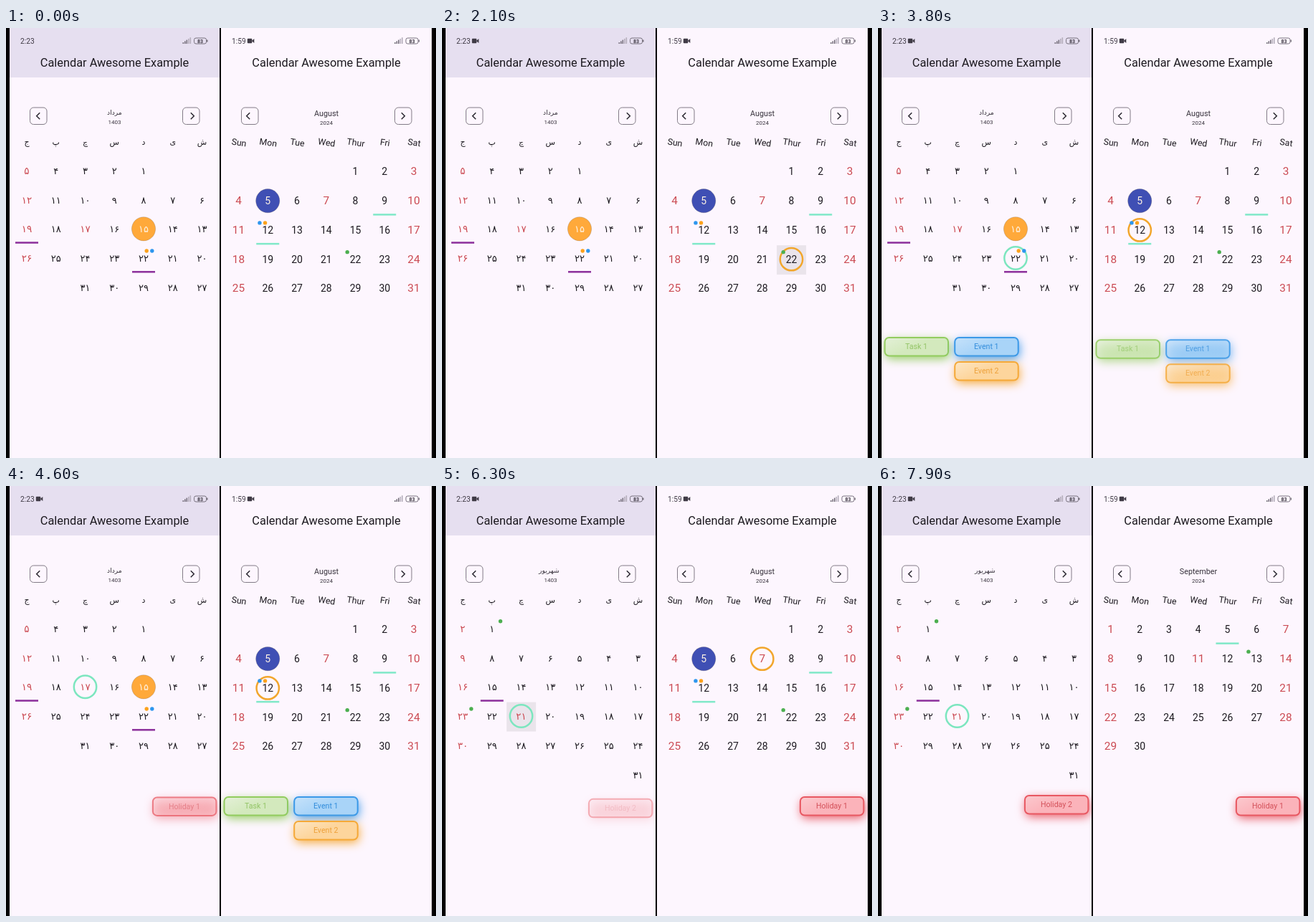
An HTML page with a canvas for the animation above (8 s loop, 600x600 px).

```html
<!DOCTYPE html>
<html lang="en">
<head>
<meta charset="utf-8">
<title>Two calendars</title>
<style>
html, body { margin: 0; width: 100%; height: 100%; overflow: hidden; background: #000; }
canvas { display: block; }
</style>
</head>
<body>
<canvas id="stage" width="600" height="600"></canvas>
<script>
const c = document.getElementById('stage').getContext('2d');
const LOOP = 8000, FADE = 700, STEP = 40.75;
const LATIN = 'Roboto, "Liberation Sans", sans-serif';
const PERSIAN = '"DejaVu Sans", sans-serif';
const INK = '#1d1a20', RED = '#cb4a52', SURFACE = '#fdf6fe';
const BLUE = '#2d96ee', ORANGE = '#fca21c', GREEN = '#4caf50';
const clamp = v => Math.max(0, Math.min(1, v));
const easeOut = v => 1 - (1 - clamp(v)) ** 3;

const CHIPS = {
  'Task 1': { col: 0, edge: '#92cc5e', pale: '#e4f0d8', fill: '#d3e9bd', ink: '#93c466' },
  'Event 1': { col: 1, edge: '#3b99e8', pale: '#c6e2fa', fill: '#a9d4f8', ink: '#338ddb' },
  'Event 2': { col: 1, row: 1, edge: '#f5a938', pale: '#fde6c4', fill: '#fdd59c', ink: '#eda13a' },
  'Event 3': { col: 1, edge: '#45a54b', pale: '#e2eee0', fill: '#d2e7d0', ink: '#5c9b61' },
  'Holiday 1': { col: 2, edge: '#e85862', pale: '#fbc9ce', fill: '#fbb3ba', ink: '#d4525b' }
};
CHIPS['Holiday 2'] = CHIPS['Holiday 1'];

// Months: blank cells before day 1, length, extra holiday, underlined days, dots by day.
// Buttons: left edge of the box and centre of its chevron.
const left = {
  x: 5, width: 293, chipX: 9.5, chipY: 431, time: '2:23', timeX: 20, cameraAt: 600, header: '#e6dff0',
  buttons: [[33, 45], [246, 260]], titleX: 151.5, titleY: 120.5, yearY: 133.5, titleSize: 9.2,
  font: PERSIAN, size: 13, redSize: 13.5, rtl: true, firstX: 273.5, firstY: 198.8, weekY: 162.5, tilt: 0,
  week: [...'شیدسچپج'], weekSize: 11, isOff: col => col === 6,
  line: '#8c2f9b', ring: '#7ce6bf', today: [0, 15, '#ffa93a'], dotX: 11.8,
  months: [
    { name: 'مرداد', year: 1403, blank: 2, days: 31, off: 17, lines: [19, 22], dots: { 22: [BLUE, ORANGE] } },
    { name: 'شهریور', year: 1403, blank: 5, days: 31, off: 21, lines: [15], dots: { 1: [GREEN], 23: [GREEN] } }
  ],
  slide: [4700, 600],
  taps: [
    { at: 2700, month: 0, day: 22, chips: ['Task 1', 'Event 1', 'Event 2'] },
    { at: 4100, month: 0, day: 17, chips: ['Holiday 1'] },
    { at: 6000, month: 1, day: 21, chips: ['Holiday 2'] }
  ]
};
const right = {
  x: 300, width: 294, chipX: 304.5, chipY: 433, time: '1:59', timeX: 315, cameraAt: 0, header: SURFACE,
  buttons: [[328, 338], [542, 554]], titleX: 447, titleY: 122.5, yearY: 134.5, titleSize: 10.8,
  font: LATIN, size: 14, redSize: 15.4, rtl: false, firstX: 324.5, firstY: 200.4, weekY: 164, tilt: 0.15,
  week: ['Sun', 'Mon', 'Tue', 'Wed', 'Thur', 'Fri', 'Sat'], weekSize: 12.3, isOff: col => col % 6 === 0,
  line: '#80e8c8', ring: '#f2a62c', today: [0, 5, '#3f4fb4'], dotX: -11.3,
  months: [
    { name: 'August', year: 2024, blank: 4, days: 31, off: 7, lines: [9, 12], dots: { 12: [BLUE, ORANGE], 22: [GREEN] } },
    { name: 'September', year: 2024, blank: 0, days: 30, off: 11, lines: [5], dots: { 13: [GREEN] } }
  ],
  slide: [6700, 750],
  taps: [
    { at: 2100, month: 0, day: 22, chips: ['Event 3'] },
    { at: 3200, month: 0, day: 12, chips: ['Task 1', 'Event 1', 'Event 2'] },
    { at: 5200, month: 0, day: 7, chips: ['Holiday 1'] }
  ]
};

function text(s, x, y, size, color = INK, font = LATIN, align = 'center', weight = 400) {
  c.font = `${weight} ${size}px ${font}`;
  c.fillStyle = color;
  c.textAlign = align;
  c.fillText(s, x, y);
}
function rect(x, y, w, h, color) {
  c.fillStyle = color;
  c.fillRect(x, y, w, h);
}
function box(x, y, w, h, r) {
  c.beginPath();
  c.roundRect(x, y, w, h, r);
}
function disc(x, y, r, color) {
  c.beginPath();
  c.arc(x, y, r, 0, 7);
  c.fillStyle = color;
  c.fill();
}
function stroke(color, width) {
  c.strokeStyle = color;
  c.lineWidth = width;
  c.stroke();
}

function statusBar(p, t) {
  text(p.time, p.timeX, 21.5, 10.2, '#403b46', LATIN, 'left');
  if (t >= p.cameraAt) {
    const x = p.timeX + 21.8;
    box(x, 14.8, 6.5, 6.5, 1);
    c.fillStyle = '#403b46';
    c.fill();
    c.beginPath();
    c.moveTo(x + 6, 18);
    c.lineTo(x + 9.5, 15);
    c.lineTo(x + 9.5, 21);
    c.fill();
  }
  const x = p.titleX + 95;
  for (let i = 0; i < 5; i++) {
    rect(x + i * 2.5, 20 - i * 1.7, 1.6, 2 + i * 1.7, i < 3 ? '#77717d' : '#b5aebb');
  }
  box(x + 16, 14, 17, 8, 2.5);
  stroke('#77717d', 1);
  rect(x + 33.5, 16.5, 1.5, 3, '#77717d');
  text('83', x + 24.5, 20.7, 7, '#403b46', LATIN, 'center', 700);
}

function navButton([x, mx], dir) {
  box(x + .5, 111, 23.5, 23.5, 5);
  stroke('#827b86', 1);
  const my = 122.7;
  c.beginPath();
  c.moveTo(mx - dir * 2.2, my - 4.5);
  c.lineTo(mx + dir * 2.3, my);
  c.lineTo(mx - dir * 2.2, my + 4.5);
  stroke('#2a2630', 1.5);
}

function monthPage(p, index, dx, dy, tap, t) {
  const m = p.months[index], dir = p.rtl ? -1 : 1;
  c.save();
  c.translate(dx, dy);
  p.week.forEach((name, i) => {
    c.save();
    c.translate(p.firstX + dir * STEP * i, p.weekY);
    c.rotate(p.tilt);
    text(name, 0, 0, p.weekSize, INK, p.font);
    c.restore();
  });
  for (let day = 1; day <= m.days; day++) {
    const cell = day - 1 + m.blank, col = cell % 7;
    const x = p.firstX + dir * STEP * col, y = p.firstY + STEP * Math.floor(cell / 7);
    const isToday = index === p.today[0] && day === p.today[1];
    const selected = tap && tap.month === index && tap.day === day;
    const off = p.isOff(col) || day === m.off;
    if (selected) {
      const press = 1 - clamp((t - tap.at - 300) / 200);
      rect(x - 20.4, y - 19.5, 41, 41, `rgba(0,0,0,${.075 * press})`);
    }
    if (isToday) {
      disc(x, y, 16.6, p.today[2]);
      stroke('rgba(100,80,70,.3)', .8);
    }
    if (selected) {
      c.beginPath();
      c.arc(x, y, 15.7, 0, 7);
      stroke(p.ring, 2.5);
    }
    const label = p.rtl ? String(day).replace(/\d/g, d => '۰۱۲۳۴۵۶۷۸۹'[d]) : day;
    text(label, x, y + 5, off ? p.redSize : p.size, isToday ? '#fff3e4' : off ? RED : INK, p.font);
    if (m.lines.includes(day)) rect(x - 16, y + 18, 32, 2.5, p.line);
    (m.dots[day] || []).forEach((color, i) => {
      disc(x + p.dotX + dir * i * 7.6, y - 10, 2.7, color);
    });
  }
  c.restore();
}

function chip(p, name, age) {
  const k = CHIPS[name], shown = clamp(age / FADE);
  const x = p.chipX + k.col * 97.7, y = p.chipY + 1 + (k.row || 0) * 34 + 8.5 * (1 - shown);
  const fill = c.createLinearGradient(x, y, x + 12, y + 26);
  fill.addColorStop(0, k.pale);
  fill.addColorStop(1, k.fill);
  c.save();
  // The tinted body comes in later than its outline.
  c.globalAlpha = shown * shown;
  box(x, y, 88.5, 25.5, 6);
  c.shadowColor = k.edge;
  c.shadowBlur = 14;
  c.shadowOffsetX = 1.5;
  c.shadowOffsetY = 4;
  c.fillStyle = fill;
  c.fill();
  c.shadowColor = 'transparent';
  text(name, x + 44, y + 16.2, 10.6, k.ink);
  c.globalAlpha = shown;
  box(x, y, 88.5, 25.5, 6);
  stroke(k.edge, 2);
  c.restore();
}

function panel(p, t) {
  c.save();
  c.beginPath();
  c.rect(p.x, 0, p.width, 600);
  c.clip();
  rect(p.x, 0, p.width, 600, SURFACE);
  rect(p.x, 0, p.width, 69, p.header);
  statusBar(p, t);
  text('Calendar Awesome Example', p.titleX, 54, 16.35);

  const moved = easeOut((t - p.slide[0]) / p.slide[1]);
  const month = p.months[moved > .5 ? 1 : 0];
  navButton(p.buttons[0], -1);
  navButton(p.buttons[1], 1);
  text(month.name, p.titleX, p.titleY, p.titleSize, '#37323c', p.font);
  text(month.year, p.titleX, p.yearY, 8, '#37323c');

  const tap = p.taps.filter(k => t >= k.at).pop();
  const dir = p.rtl ? -1 : 1;
  // The six-row month settles upward after its page arrives.
  const drop = p.rtl ? 20.4 * (1 - clamp((t - 5200) / 480)) : 0;
  if (moved < 1) monthPage(p, 0, -dir * p.width * moved, 0, tap, t);
  if (moved > 0) monthPage(p, 1, dir * p.width * (1 - moved), drop, tap, t);
  if (tap) tap.chips.forEach(name => chip(p, name, t - tap.at));
  c.restore();
}

function frame(now) {
  const t = now % LOOP;
  rect(0, 0, 600, 600, '#000');
  panel(left, t);
  panel(right, t);
  requestAnimationFrame(frame);
}
requestAnimationFrame(frame);
</script>
</body>
</html>
```
